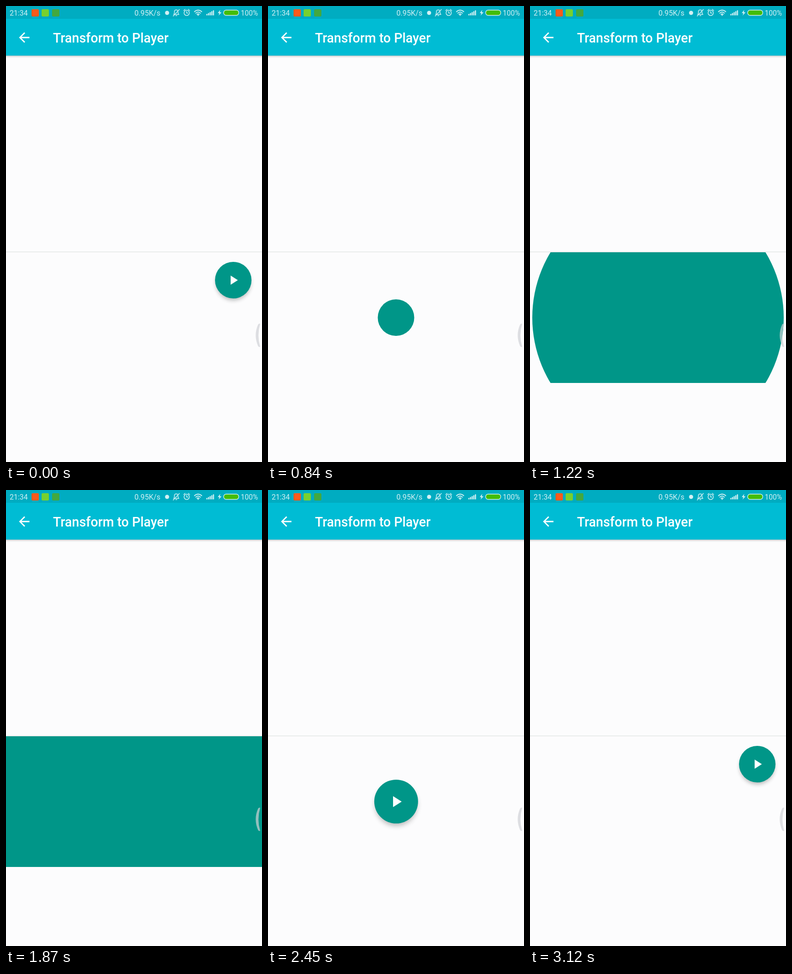
Recreate the animation shown at these times as an HTML page. Size 561x998 px, loop 4.06 s.

```html
<!DOCTYPE html>
<html lang="en">
<head>
<meta charset="utf-8">
<title>Transform to Player</title>
<style>
  html, body { margin: 0; width: 100%; height: 100%; overflow: hidden; background: #fcfcfd; }
  svg { display: block; width: 100vw; height: 100vh; }
  text { font-family: Roboto, sans-serif; fill: #fff; }
  .status text { fill: #d3f0f4; }
  .line { fill: none; stroke: #d3f0f4; stroke-width: 1.5; stroke-linecap: round; stroke-linejoin: round; }
  .solid { fill: #d3f0f4; }
</style>
</head>
<body>
<svg viewBox="0 0 561 998" preserveAspectRatio="none">
  <defs>
    <clipPath id="panel"><rect y="539" width="561" height="286"/></clipPath>
    <filter id="blur" x="-50%" y="-50%" width="200%" height="200%"><feGaussianBlur stdDeviation="5"/></filter>
    <linearGradient id="fade" x2="0" y2="1">
      <stop stop-color="#000" stop-opacity=".28"/>
      <stop offset=".4" stop-color="#000" stop-opacity=".09"/>
      <stop offset="1" stop-color="#000" stop-opacity="0"/>
    </linearGradient>
  </defs>

  <rect width="561" height="998" fill="#fcfcfd"/>
  <rect y="537.5" width="561" height="1.5" fill="#e4e7e6"/>

  <rect y="108" width="561" height="6" fill="url(#fade)"/>
  <rect width="561" height="108.5" fill="#00bcd4"/>
  <rect width="561" height="28" fill="#00acc1"/>

  <path transform="translate(22.8 51.8) scale(1.43)" fill="#fff"
    d="M20 11H7.83l5.59-5.59L12 4l-8 8 8 8 1.41-1.41L7.83 13H20z"/>
  <text x="103" y="80" font-size="28.6" font-weight="500">Transform to Player</text>

  <g class="status">
    <text x="8" y="20.5" font-size="16">21:34</text>
    <rect x="56" y="7" width="16" height="16" rx="2.5" fill="#fb5a1b"/>
    <rect x="78" y="7" width="16" height="16" rx="2.5" fill="#78d02e"/>
    <rect x="101" y="7" width="16" height="16" rx="2.5" fill="#43a83f"/>
    <text x="281.5" y="20.5" font-size="16.2">0.95K/s</text>
    <circle class="solid" cx="353" cy="15" r="4.5"/>
    <g class="line">
      <path d="M367.500 18.500h11.500q-2-1.500-2-4v-2q0-4-4-4t-4 4v2q0 2.500-1.500 4M372 21h2.500M380 7.500L366.500 22"/>
      <circle cx="396" cy="15" r="5.800"/>
      <path d="M396 11.800V15.500h2.800M389.500 10l3-2.800M402.500 10l-3-2.800"/>
      <path d="M413 12.500q8-7 16 0M415.800 15.600q5.200-4.600 10.400 0M418.500 18.200q2.500-2 5 0" stroke-width="1.800"/>
      <rect x="477" y="9" width="33" height="11.500" rx="5.500" fill="#43bd08" stroke-width="1.400"/>
    </g>
    <circle class="solid" cx="421" cy="20" r="1.400"/>
    <g id="bars" class="solid"></g>
    <path class="solid" d="M469.500 8.500l-5.500 7h3.600l-1.600 5.500 6.300-7.300h-3.800z"/>
    <text x="514.500" y="20.500" font-size="15.600">100%</text>
  </g>

  <g clip-path="url(#panel)"><circle id="reveal" cx="280.5" cy="682" r="40" fill="#009688"/></g>

  <g id="fab">
    <circle cy="6" r="38" fill="#000" opacity=".27" filter="url(#blur)"/>
    <circle r="40" fill="#009688"/>
    <circle id="press" r="40" fill="#000"/>
    <path transform="translate(-17.1 -17.1) scale(1.43)" fill="#fff" d="M8 5v14l11-7z"/>
  </g>

  <path d="M557 695.500q-3-1-4.500 1.500q-10.500 23.500 0 47.500q1.500 2.500 4.500 1.500q-7.500-25 0-50.500z"
    fill="#d0d1d5" fill-opacity=".7"/>
</svg>
<script>
  const LOOP = 4060;
  const HOME = { x: 498, y: 600 }, MID = { x: 280.5, y: 682 };
  const R_MIN = 40, R_MAX = Math.hypot(280.5, 143) + 1;
  const HOLDS = [[2030, 2130], [2450, 2550]];
  const byId = id => document.getElementById(id);
  const fab = byId('fab'), reveal = byId('reveal'), press = byId('press');

  byId('bars').innerHTML = [3, 5, 7, 9, 11]
    .map((h, i) => `<rect x="${439 + i * 3.6}" y="${20.5 - h}" width="2.5" height="${h}"/>`).join('');

  const span = (t, from, to) => Math.min(1, Math.max(0, (t - from) / (to - from)));
  const mix = (a, b, k) => a + (b - a) * k;
  const accel = k => k * k;
  const smooth = k => 0.5 - 0.5 * Math.cos(Math.PI * k);

  // cubic-bezier(.4, 0, .2, 1)
  function fastOut(k) {
    let lo = 0, hi = 1;
    for (let i = 0; i < 24; i++) {
      const s = (lo + hi) / 2, q = 1 - s;
      const x = 1.2 * q * q * s + 0.6 * q * s * s + s * s * s;
      if (x < k) lo = s; else hi = s;
    }
    return lo * lo * (3 - 2 * lo);
  }

  function draw(now) {
    let t = now % LOOP;
    for (const [from, to] of HOLDS) if (t >= from && t < to) t = from;

    const open = t >= 840 && t < 2410;
    fab.style.display = open ? 'none' : '';
    reveal.style.display = open ? '' : 'none';

    if (open) {
      const k = t < 1600 ? fastOut(span(t, 940, 1430)) : 1 - fastOut(span(t, 1855, 2305));
      reveal.setAttribute('r', mix(R_MIN, R_MAX, k));
    } else {
      const k = t < 840 ? accel(span(t, 402, 838)) : 1 - smooth(span(t, 2440, 2835));
      const x = mix(HOME.x, MID.x, k), y = mix(HOME.y, MID.y, k);
      fab.setAttribute('transform', `translate(${x} ${y}) scale(${1 + 0.2 * k})`);
      press.setAttribute('opacity', 0.09 * (span(t, 330, 430) - span(t, 640, 830)));
    }
  }

  function tick() {
    draw(performance.now());
    requestAnimationFrame(tick);
  }
  tick();
</script>
</body>
</html>
```
